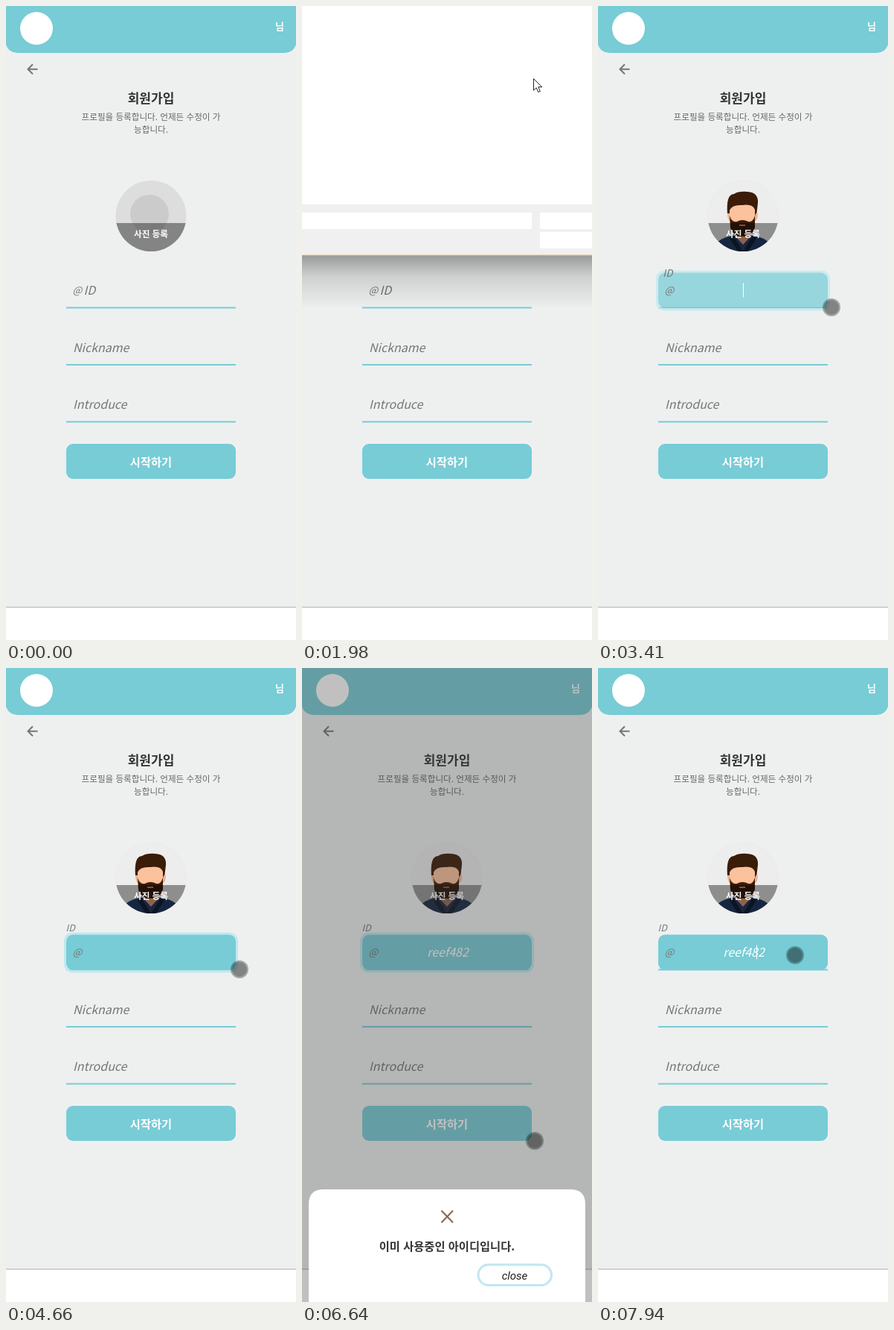
Recreate the animation shown at these times as an HTML page. Size 390 px wide and 850 px high, loop 8 s.

```html
<!DOCTYPE html>
<html lang="ko">
<head>
<meta charset="utf-8">
<title>회원가입</title>
<style>
  html, body { margin: 0; height: 100%; overflow: hidden; background: #eef0f0; }
  svg { display: block; width: 390px; height: 850px; }
  text { font-family: 'Noto Sans CJK KR', 'Noto Sans KR', sans-serif; white-space: pre; }
  .mid { text-anchor: middle; }
  .bold { font-weight: 700; }
  .sub { font-size: 11.6px; font-weight: 500; fill: #666; }
  .field { font-size: 16px; font-weight: 500; font-style: italic; fill: #757575; }
  .typed { fill: #fff; text-anchor: middle; }
  .white { fill: #fff; }
  .teal { fill: #77ccd6; }
</style>
</head>
<body>
<svg id="stage" viewBox="0 0 390 850">
  <defs>
    <clipPath id="round"><circle cx="195" cy="281.5" r="47.5"/></clipPath>
    <linearGradient id="shade" x2="0" y2="1">
      <stop offset="0" stop-opacity=".36"/>
      <stop offset=".4" stop-opacity=".13"/>
      <stop offset="1" stop-opacity="0"/>
    </linearGradient>
  </defs>

  <rect width="390" height="850" fill="#eef0f0"/>
  <path class="teal" d="M0 0H390V52Q386 63 374 63H16Q4 63 0 52Z"/>
  <circle class="white" cx="41" cy="30" r="22"/>
  <text class="white bold mid" x="368" y="32" font-size="13">님</text>
  <path d="M42.5 84.7H30M36 78.2L29.5 84.7L36 91.2" fill="none" stroke="#757575" stroke-width="2"/>

  <text class="bold mid" x="195" y="130.3" font-size="17" fill="#333">회원가입</text>
  <text class="sub mid" x="195" y="153">프로필을 등록합니다. 언제든 수정이 가</text>
  <text class="sub mid" x="195" y="170">능합니다.</text>

  <g clip-path="url(#round)">
    <rect x="147" y="233" width="96" height="97" fill="#ddd"/>
    <circle cx="193" cy="279" r="26" fill="#cbcbcb"/>
    <g id="avatar">
      <rect x="147" y="233" width="96" height="97" fill="#ededed"/>
      <path d="M154 330Q157 312 180 308H210Q233 312 236 330Z" fill="#26406b"/>
      <path d="M181 307L195 329L209 307L213 312L201 330H189L177 312Z" fill="#16223a"/>
      <path d="M184 296H206V308L195 320L184 308Z" fill="#e8a782"/>
      <path d="M174 279Q172 252 183 252Q189 248 201 249Q216 250 215 264L213 281Z" fill="#3b1c08"/>
      <path d="M177 278H174Q174 288 179 289ZM212 278H215Q215 288 210 289Z" fill="#f0b18b"/>
      <path d="M177 274Q180 266 194 267Q208 265 211 273V288Q207 299 194 299Q181 299 177 288Z" fill="#fcc19d"/>
      <path d="M177 281Q180 291 187 289Q194 285 202 289Q208 291 211 281L211 297Q207 309 194 309Q181 309 178 297Z" fill="#3b1c08"/>
      <path d="M190 294H198" stroke="#d08a70" stroke-width="2"/>
    </g>
    <rect x="147" y="291" width="96" height="40" fill-opacity=".4"/>
  </g>
  <text class="white bold mid" x="195" y="310.3" font-size="11.6">사진 등록</text>

  <rect class="teal" x="81" y="403.5" width="228" height="2"/>
  <rect class="teal" x="81" y="480" width="228" height="2"/>
  <rect class="teal" x="81" y="556.5" width="228" height="2"/>
  <rect id="ring" x="79.5" y="356" width="231" height="51" rx="10" fill="none" stroke="#bfe9ee" stroke-width="3"/>
  <rect id="fill" class="teal" x="81" y="357.5" width="228" height="47.5" rx="9"/>
  <text class="field" x="89.5" y="385.8" style="font-size:13.5px">@</text>
  <text id="label" class="field">ID</text>
  <g id="entry"></g>
  <text class="field" x="90" y="463.5">Nickname</text>
  <text class="field" x="90" y="540">Introduce</text>

  <rect class="teal" x="81" y="587" width="228" height="47" rx="9"/>
  <text class="white bold mid" x="195" y="616.5" font-size="15.3">시작하기</text>
  <rect y="807" width="390" height="43" fill="#fff"/>
  <rect y="805" width="390" height="2" fill="#d0d0d0"/>

  <rect id="dim" width="390" height="850" fill="#3d3d3d" fill-opacity=".32"/>
  <g id="modal">
    <path class="white" d="M9 850V719Q9 699 29 699H361Q381 699 381 719V850Z"/>
    <path d="M187.5 727.5L203 743.5M203 727.5L187.5 743.5" stroke="#8a6255" stroke-width="2"/>
    <text class="bold mid" x="195" y="781.3" font-size="15.3" fill="#333">이미 사용중인 아이디입니다.</text>
    <rect x="237" y="800" width="98.5" height="27.5" rx="13.7" fill="#fff" stroke="#c0e8ef" stroke-width="3"/>
    <text class="mid" x="286" y="820" fill="#222" style="font:italic 15px Roboto,sans-serif">close</text>
  </g>

  <g id="dialog">
    <rect y="334" width="390" height="72" fill="url(#shade)"/>
    <rect width="390" height="334" fill="#fff"/>
    <rect y="266" width="390" height="68" fill="#f0f0f0"/>
    <path d="M0 277H309V299H0ZM320 277H390V299H320ZM320 303H390V325H320Z" fill="#fff"/>
    <rect y="333.5" width="390" height="1" fill="#e8c48c"/>
  </g>
  <g id="arrow">
    <path id="tip" d="M.5 .5V16L4.2 12.6L6.7 18.5L9.3 17.4L6.8 11.6H11.8Z" fill="#fff" stroke="#222"/>
  </g>
  <g id="touch">
    <g id="dot">
      <circle r="12" fill-opacity=".3"/>
      <circle r="10" fill-opacity=".22"/>
    </g>
  </g>
</svg>
<script>
  const LOOP = 8000;
  const $ = id => document.getElementById(id);

  // steps: [time, value, easing to the next step]
  function play(el, prop, steps, easing = 'linear') {
    const all = [...steps];
    if (all[0][0] > 0) all.unshift([0, all[0][1]]);
    if (all[all.length - 1][0] < LOOP) all.push([LOOP, all[all.length - 1][1]]);
    const frames = all.map(([t, v, e]) => ({ offset: t / LOOP, [prop]: v, easing: e || easing }));
    el.animate(frames, { duration: LOOP, iterations: Infinity });
  }

  // Alternating on and off times
  const show = (el, ...times) =>
    play(el, 'opacity', [[0, 0], ...times.map((t, i) => [t, 1 - i % 2])], 'step-end');

  const move = (el, points) =>
    play(el, 'transform', points.map(([t, x, y, e]) => [t, `translate(${x}px, ${y}px)`, e]));

  function add(tag, attrs, text = '') {
    const el = document.createElementNS('http://www.w3.org/2000/svg', tag);
    for (const k in attrs) el.setAttribute(k, attrs[k]);
    el.textContent = text;
    return $('entry').appendChild(el);
  }
  const caret = (x, ...times) =>
    show(add('rect', { x, y: 371.5, width: 1, height: 19, fill: '#fff' }), ...times);

  // Pointers
  show($('touch'), 70, 1160, 2470);
  move($('dot'), [
    [70, 350, 814, 'ease-in-out'], [820, 198, 317],
    [2470, 310, 105, 'ease-in'], [2670, 261, 220],
    [2950, 296, 527, 'ease-in-out'], [3240, 314, 404],
    [6150, 314, 404, 'ease-in-out'], [6600, 313, 634],
    [6680, 313, 634, 'ease-in-out'], [6910, 290, 814],
    [7200, 290, 814, 'ease-in'], [7500, 262, 556],
    [7680, 239, 458], [7870, 265, 385]
  ]);
  show($('arrow'), 1160, 2470);
  move($('tip'), [[1770, 198, 317, 'ease-in-out'], [1980, 311, 97]]);

  // File dialog
  play($('dialog'), 'opacity', [[1160, 0], [1440, 1], [2400, 1], [2620, 0]]);
  show($('avatar'), 3270);

  // ID field
  play($('fill'), 'opacity', [[3270, 0, 'ease'], [3600, 1]]);
  play($('ring'), 'opacity', [[3270, 0, 'ease'], [3600, 1], [7050, 1], [7250, 0]]);
  play($('label'), 'transform', [
    [3270, 'translate(104.5px, 387px) scale(1)', 'ease'],
    [3600, 'translate(80.5px, 353.3px) scale(.78)']
  ]);
  caret(195, 3270, 3730, 4200, 4660);

  const name = 'reef482';
  const keys = [4730, 4800, 4870, 5020, 5220, 5340, 5480, LOOP];
  for (let i = 0; i < name.length; i++) {
    const el = add('text', { class: 'field typed', x: 196, y: 387 }, name.slice(0, i + 1));
    show(el, keys[i], keys[i + 1]);
    caret(196 + el.getComputedTextLength() / 2, keys[i], Math.min(keys[i + 1], 5940));
  }
  caret(213, 7870);

  // Alert sheet
  play($('dim'), 'opacity', [[0, 0, 'step-end'], [5940, 1], [6980, 1], [7300, 0]]);
  move($('modal'), [
    [6150, 0, 160, 'ease-out'], [6500, 0, 0],
    [6980, 0, 0, 'ease-in'], [7400, 0, 160]
  ]);
</script>
</body>
</html>
```
